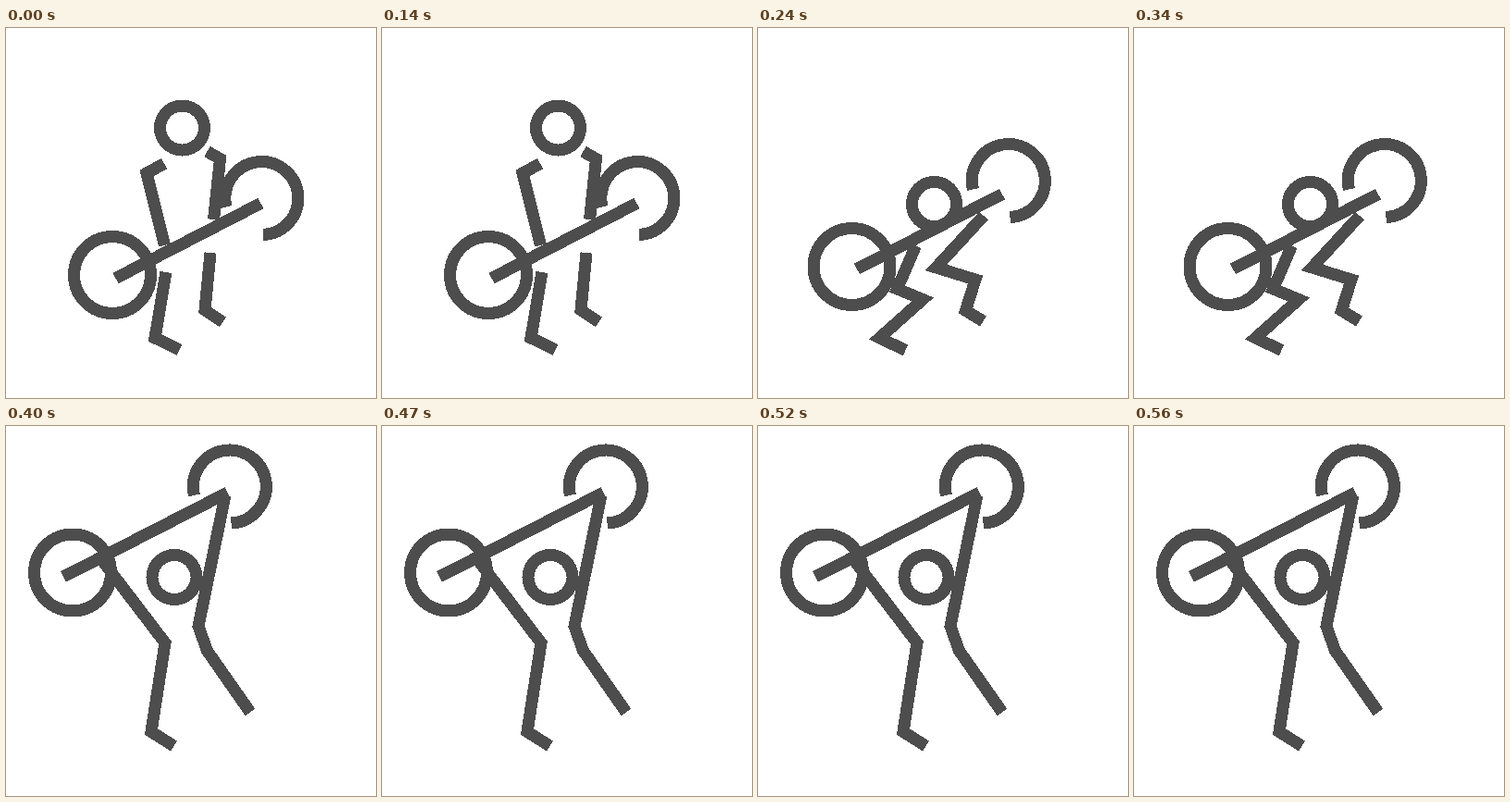
An HTML page for the animation above (600 ms loop, 400x400 px).

```html
<!DOCTYPE html>
<html lang="en">
<head>
<meta charset="utf-8">
<title>Weightlifter</title>
<style>
  html, body { margin: 0; width: 100%; height: 100%; overflow: hidden; background: #fff; }
  svg { display: block; width: 100vw; height: 100vh; }
  .pose {
    fill: none;
    stroke: #4d4d4d;
    stroke-width: 13;
    stroke-miterlimit: 10;
    shape-rendering: crispEdges;
    visibility: hidden;
    animation: 600ms step-end infinite;
  }
  .stand { animation-name: stand; }
  .squat { animation-name: squat; }
  .press { animation-name: press; }
  @keyframes stand { 0% { visibility: visible; } 40%, 100% { visibility: hidden; } }
  @keyframes squat { 0% { visibility: hidden; } 40% { visibility: visible; } 66.6667%, 100% { visibility: hidden; } }
  @keyframes press { 0% { visibility: hidden; } 66.6667%, 100% { visibility: visible; } }
</style>
</head>
<body>
<svg viewBox="0 0 400 400">
  <defs>
    <circle id="head" r="24"/>
    <circle id="plate" r="41.5"/>
    <path id="open" d="M-38.5 9.5A39.5 39.5 0 1 1 1.5 39.5"/>
  </defs>

  <g class="pose stand">
    <use href="#head" x="190.5" y="108"/>
    <use href="#plate" x="115" y="267"/>
    <use href="#open" x="276.5" y="184"/>
    <path d="M118.5 270.5L275.5 189.5"/>
    <path d="M171 146.5L152 157L171.5 235"/>
    <path d="M217.5 133.5L231.5 141.5L224.5 207"/>
    <path d="M173 264L161 335L187.5 348"/>
    <path d="M221 243L215 305L234.5 318"/>
  </g>

  <g class="pose squat">
    <use href="#head" x="190.5" y="190.5"/>
    <use href="#plate" x="101.5" y="258"/>
    <use href="#open" x="271" y="165"/>
    <path d="M107 260.5L264 179.5"/>
    <path d="M170.5 235.5L150.5 282L178 293.5L131.5 335L159.5 348.5"/>
    <path d="M244 203L192.5 259L235 272L224.5 305.5L243.5 317"/>
  </g>

  <g class="pose press">
    <use href="#head" x="182" y="163.5"/>
    <use href="#plate" x="72" y="158.5"/>
    <use href="#open" x="242" y="65.5"/>
    <path d="M62 163L239.5 72"/>
    <path d="M104.5 146L172 234.5L157 330.5L181.5 346"/>
    <path d="M237 75L208 216.5L217.5 243L264 309.5"/>
  </g>
</svg>
</body>
</html>
```
